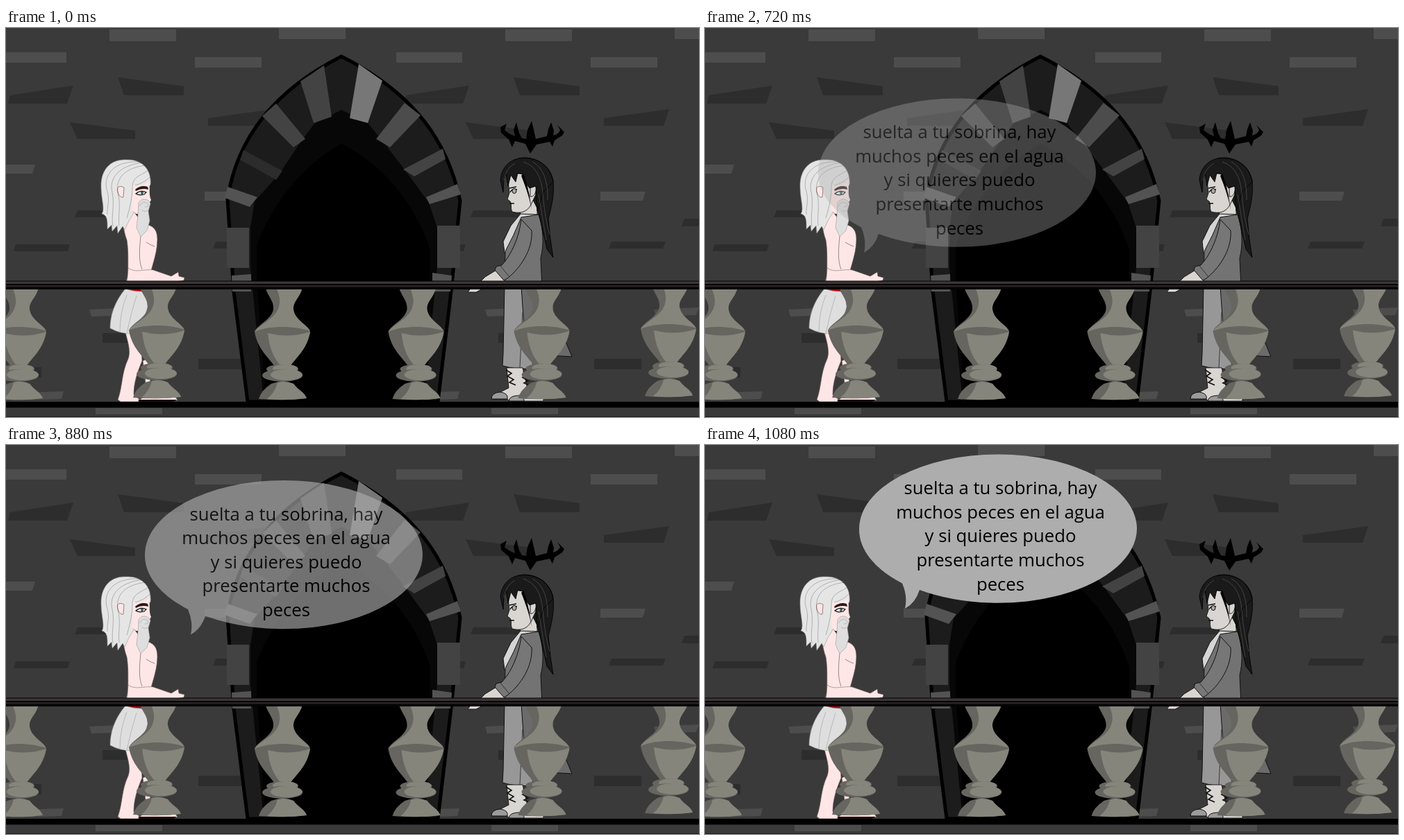
Animation, 998 px wide and 561 px high, one loop 3.52 s. Source, as an HTML page:

```html
<!DOCTYPE html>
<html lang="es">
<head>
<meta charset="utf-8">
<style>
  html, body { margin: 0; width: 100%; height: 100%; overflow: hidden; background: #3a3a3a; }
  svg { display: block; width: 100%; height: 100%; }
  text { font: 25.7px "Open Sans", "Noto Sans", sans-serif; text-anchor: middle; }
  .ink { fill: none; stroke: #222; stroke-width: .8; }
  .skin { fill: #ffe6e6; stroke: #6b5555; stroke-width: .7; }
  .white { fill: #e5e5e5; stroke: #999; stroke-width: .6; }
  .pale { fill: #d9d5d1; stroke: #111; stroke-width: .9; }
  .hair { fill: #1a1a1a; stroke: #000; stroke-width: .9; }
  .cloth { stroke: #111; stroke-width: 1; }
</style>
</head>
<body>
<svg viewBox="0 0 998 561">
  <defs>
    <g id="bricks">
      <path fill="#4d4d4d" d="M149 2h96v17h-96zM-8 35h95v15H-8zM272 42h96v15h-96zM393 0h96v16h-96z
        M-22 197h64l-4 13h-60zM286 236h65l-4 13h-61zM120 406l65-3-4 11-58 2zM363 406l65-3-4 11-58 2z
        M22 526l61-2-3 11-60 2zM129 548h96v9h-96z"/>
      <path fill="#2d2d2d" d="M161 71l95 13v13h-86zM6 97l91-14-9 26H3zM92 136l94 12v12h-83zM291 130l94-13-8 24h-86z
        M103 263h77l-3 10H99zM14 312h78l-3 10H11zM302 308h78l-4 10h-78zM407 275h78l-4 11h-78z
        M139 440h62v14h-62zM277 477h68v15h-68zM-10 489h61v15h-61z"/>
    </g>
    <g id="baluster">
      <path fill="#66655f" d="M-25 374H29C25 390 15 394 16 406 18 421 36 428 40 438 36 463 19 476 11 488H-11
        C-19 476-36 463-40 438-35 427-16 421-13 406-12 394-19 390-25 374z"/>
      <path fill="#85857b" d="M-9 374H29C25 390 15 394 16 406 18 421 36 428 40 437 18 430-14 428-40 438
        -32 427-14 421-7 407-2 397-3 388-9 374z"/>
      <path fill="#85857b" d="M40 438C36 463 19 476 11 488H-1C-11 479-19 462-21 440Q10 448 40 438z"/>
      <ellipse fill="#66655f" cy="492" rx="23" ry="7"/>
      <ellipse fill="#85857b" cx="4" cy="491" rx="18" ry="6"/>
      <ellipse fill="#66655f" cy="501" rx="29" ry="9"/>
      <ellipse fill="#85857b" cx="6" cy="500" rx="23" ry="8"/>
      <path fill="#66655f" d="M-16 513Q0 507 16 513C22 522 32 525 35 534Q0 538-34 535-31 523-16 513z"/>
      <path fill="#85857b" d="M-7 511Q6 508 16 513C22 522 32 525 35 534Q5 538-22 535-10 525-7 511z"/>
    </g>
  </defs>

  <rect width="998" height="561" fill="#3a3a3a"/>
  <use href="#bricks"/>
  <use href="#bricks" x="570"/>

  <g id="arch">
    <path fill="#1c1c1c" stroke="#000" stroke-width="5" d="M348 539L328 380 319 247C332 162 382 92 483 41
      590 95 636 165 654 249L641 380 622 539z"/>
    <path fill="#070707" d="M371 539L352 345V288L358 250 393 211 424 165 444 138 483 118 521 137 543 164 577 208 609 252 621 288V345L602 539z"/>
    <path d="M374 539L361 360V313C388 245 431 196 483 167 541 196 588 250 611 320V360L600 539z"/>
    <path fill="#434343" d="M424 77l34-23 11 74-26 9zM389 109l42 51-17 12-45-45zM318 288h32v58h-32zM621 285h33v61h-33z
      M629 174l4 15-45 25-16-10z"/>
    <path fill="#777" d="M508 52l34 24-21 61-26-7z"/>
    <path fill="#4c4c4c" d="M574 108l23 18-44 46-20-12z"/>
    <path fill="#2c2c2c" d="M342 176l56 30-9 13-52-29z"/>
    <path fill="#535353" d="M319 229l43 15-11 14-36-13zM650 225l5 15-45 14-5-10zM325 357l28-2v25h-27zM614 353l28 4-2 23h-26z"/>
  </g>

  <g id="elder">
    <path class="skin" d="M172 439C175 452 180 465 176 477 166 498 168 517 161 536L165 539H190L193 536 184 529C184 510 190 495 196 480L194 435z"/>
    <path class="skin" d="M197 480l9-4 3 52 36 5 2 4h-56l12-8z"/>
    <path d="M190 536h56l-5 3h-48z" fill="#1b0d0d"/>
    <path class="skin" d="M170 262C167 278 169 292 174 306 177 325 175 345 176 355L171 373H205C206 350 218 330 218 305 218 293 214 287 205 284L190 266z"/>
    <path class="ink" stroke-opacity=".6" d="M194 300C192 320 191 336 196 348M202 309q6 4 12 6"/>
    <path d="M184 265h8l-2 8z" fill="#333"/>
    <path class="skin" stroke-opacity=".7" d="M176 346C186 354 199 347 212 349L238 358 248 352 249 358 257 360 256 364 244 366 240 371H174z"/>
    <path d="M170 370h25l-1 10q-14 1-24-4z" fill="#b90009"/>
    <path class="white" d="M172 376C156 395 150 415 150 433Q165 441 181 441 200 425 204 402 203 384 195 380 183 380 172 376z" style="fill:#dedede"/>
    <path class="ink" stroke-opacity=".25" d="M174 385q-10 25-10 53M188 386q-8 25-14 54"/>
    <path class="white" d="M173 190C150 189 136 205 137 230 137 246 143 262 138 268 147 270 146 280 146 290L152 284 153 293 160 285 161 296 168 286 171 291 177 278 183 268 190 250 208 226C210 203 195 189 173 190z"/>
    <path fill="#ffe6e6" d="M183 226Q195 230 206 221C208 232 205 239 209 248 204 256 205 262 200 268H187L181 262z"/>
    <path class="skin" d="M170 230c-7-4-11 0-9 6 1 6 5 9 8 8z"/>
    <path class="ink" stroke-opacity=".35" d="M198 194c-36 4-50 23-45 43 4 20-2 34 1 49M193 193c-42-2-54 23-47 43 4 16-1 20 0 33
      M201 198c-32 4-43 20-40 39 5 20 0 33 2 48M206 205c-16 9-24 11-24 25 0 16-5 34-8 44M208 214q-8 9-22 13"/>
    <path d="M186 233q8-7 18-4l1 4q-9-3-18 2z" fill="#2b1715"/>
    <path d="M187 239q7-6 15-2l-3 3q-7 2-12-1z" fill="#e9f2ef" stroke="#111" stroke-width="1.2"/>
    <circle cx="196" cy="238" r="2" fill="#385a57"/>
    <path class="white" d="M191 252C195 245 204 245 208 253L205 264 207 278 203 292 194 301 188 288 190 270z" style="fill:#dedede"/>
    <path class="ink" stroke-opacity=".25" d="M192 257q5-9 12-4q3 5-4 5M196 263q4 3 8 0"/>
  </g>

  <g id="king">
    <path d="M713 151L712 143 721 138 718 147Q724 153 733 156L731 147 735 136 739 152 743 159 749 160 751 147 757 134 760 147 763 160 779 156 781 146 785 136 789 148 788 155Q797 152 798 147L794 140 804 150 801 155 790 162 787 171 783 164 764 168 755 181 748 167 733 163 729 172 724 161z"/>
    <path class="cloth" fill="#6b6b6b" d="M741 370H772L815 474 743 470z"/>
    <path class="cloth" fill="#979797" d="M718 372L716 470 715 487Q735 493 760 491L746 430 742 372z"/>
    <path class="ink" d="M744 410l-4 80"/>
    <path class="pale" d="M721 490H744L750 515 748 527 774 533V538H724L722 535H699Q699 527 712 525L724 519z"/>
    <path class="cloth" fill="#9b9b9b" d="M699 535q0-9 13-10 12 2 10 10zM724 538q1-8 15-8 8 3 7 8z"/>
    <path fill="none" stroke="#111" stroke-width="1.6" d="M720 493l8 5-6 4 9 5-6 4 9 4M745 495l5 7-6 2 8 5-6 3 9 4"/>
    <path class="pale" d="M740 258L765 246V272L741 275z"/>
    <path class="cloth" fill="#d5d5d5" d="M741 268L727 285 716 308 718 325 738 300 765 269z"/>
    <path class="cloth" fill="#737373" d="M742 273L767 269C774 290 775 312 770 332L772 373H718L719 322Q731 300 742 273z"/>
    <path class="pale" d="M708 348L690 359 682 367 664 372 661 376 668 377 665 381 677 381 690 374 719 365z"/>
    <path class="cloth" fill="#777" d="M742 276C739 302 728 327 714 342L706 344 704 349 717 364 722 361C740 347 759 320 757 292z"/>
    <path class="ink" d="M712 343l13 16"/>
    <path class="hair" d="M736 189C750 183 782 190 788 220 790 242 785 259 781 275L784 305 788 331 779 319 773 292 766 262 755 240z"/>
    <path class="pale" d="M722 210L760 210 763 240 756 255C750 266 740 268 729 265 726 260 729 255 726 250L722 247 725 238z"/>
    <path class="pale" d="M755 231c6-7 10-3 8 4-1 6-5 9-8 8z"/>
    <path class="hair" d="M739 188C722 191 713 205 712 219L716 237 717 220 720 210 723 228 727 212 734 222 737 209 744 211Q749 226 754 231L763 228 765 264 774 236 788 222C784 199 766 185 739 188z"/>
    <path d="M745 210Q753 230 757 262 754 243 742 213z"/>
    <path fill="none" stroke="#555" stroke-width=".7" d="M745 193q25 8 28 45t10 60M758 193q23 12 22 55M733 195q-14 8-16 25M767 240l11 66"/>
    <path fill="none" stroke="#111" stroke-width="1.4" d="M725 231l10-2M726 237q3-6 10-4M725 253l7 0"/>
    <ellipse cx="732" cy="235" rx="3" ry="3.5" fill="#aaa" stroke="#111"/>
  </g>

  <g id="balusters"></g>
  <g id="rail">
    <rect y="364.5" width="998" height="12.500" fill="#050404"/>
    <rect y="365.5" width="998" height="3.5" fill="#3b3537"/>
    <rect y="371" width="998" height="2.5" fill="#2a2325"/>
  </g>
  <rect y="539" width="998" height="8.5"/>
  <rect y="560" width="998" height="1" fill="#1a1a1a"/>

  <g id="bubble">
    <path fill="#adadad" d="M222 121A200 107.5 0 0 1 622 121A200 107.5 0 0 1 309 209Q303 228 288 236 292 218 284 199.500A200 107.5 0 0 1 222 121z"/>
  </g>
</svg>
<script>
const SVG = 'http://www.w3.org/2000/svg';
const LOOP = 3520, START = 560, STEP = 40, LAST = 13;
const lines = ['suelta a tu sobrina, hay', 'muchos peces en el agua', 'y si quieres puedo', 'presentarte muchos', 'peces'];
// [step, dx, dy] relative to the resting place
const path = [[0, -92, 75.5], [2, -77, 91.5], [4, -59, 88], [6, -38.5, 64.5], [8, -22, 37.5], [11, -5.2, 6.5], [13, 0, 0]];
const bubble = document.getElementById('bubble');

function add(parent, tag, attributes, content = '') {
  const node = document.createElementNS(SVG, tag);
  for (const name in attributes) node.setAttribute(name, attributes[name]);
  node.textContent = content;
  parent.append(node);
}

for (const [x, y] of [[18, 0], [217, -2], [398, 0], [590.5, 0], [771.5, -1], [954, -4]])
  add(document.getElementById('balusters'), 'use', { href: '#baluster', x, y });
lines.forEach((line, i) => add(bubble, 'text', { x: 425.5, y: 71 + i * 34.65 }, line));

// Smooth curve through the path points
function along(step, axis) {
  const i = Math.min(path.findLastIndex(p => p[0] <= step), path.length - 2);
  const slope = j => {
    const a = path[Math.max(j - 1, 0)], b = path[Math.min(j + 1, path.length - 1)];
    return (b[axis] - a[axis]) / (b[0] - a[0]);
  };
  const [a, b] = [path[i], path[i + 1]];
  const span = b[0] - a[0], u = (step - a[0]) / span, v = 1 - u;
  return v * v * (1 + 2 * u) * a[axis] + u * u * (1 + 2 * v) * b[axis]
    + span * u * v * (v * slope(i) - u * slope(i + 1));
}

function draw(now) {
  const step = Math.min(LAST, Math.floor((now % LOOP - START) / STEP));
  bubble.style.display = step < 0 ? 'none' : '';
  if (step >= 0) {
    bubble.setAttribute('opacity', (step + 1) / (LAST + 1));
    bubble.setAttribute('transform', `translate(${along(step, 1)} ${along(step, 2)})`);
  }
}

let origin;
function tick(now) {
  origin ??= now;
  draw(now - origin);
  requestAnimationFrame(tick);
}
draw(0);
requestAnimationFrame(tick);
</script>
</body>
</html>
```
